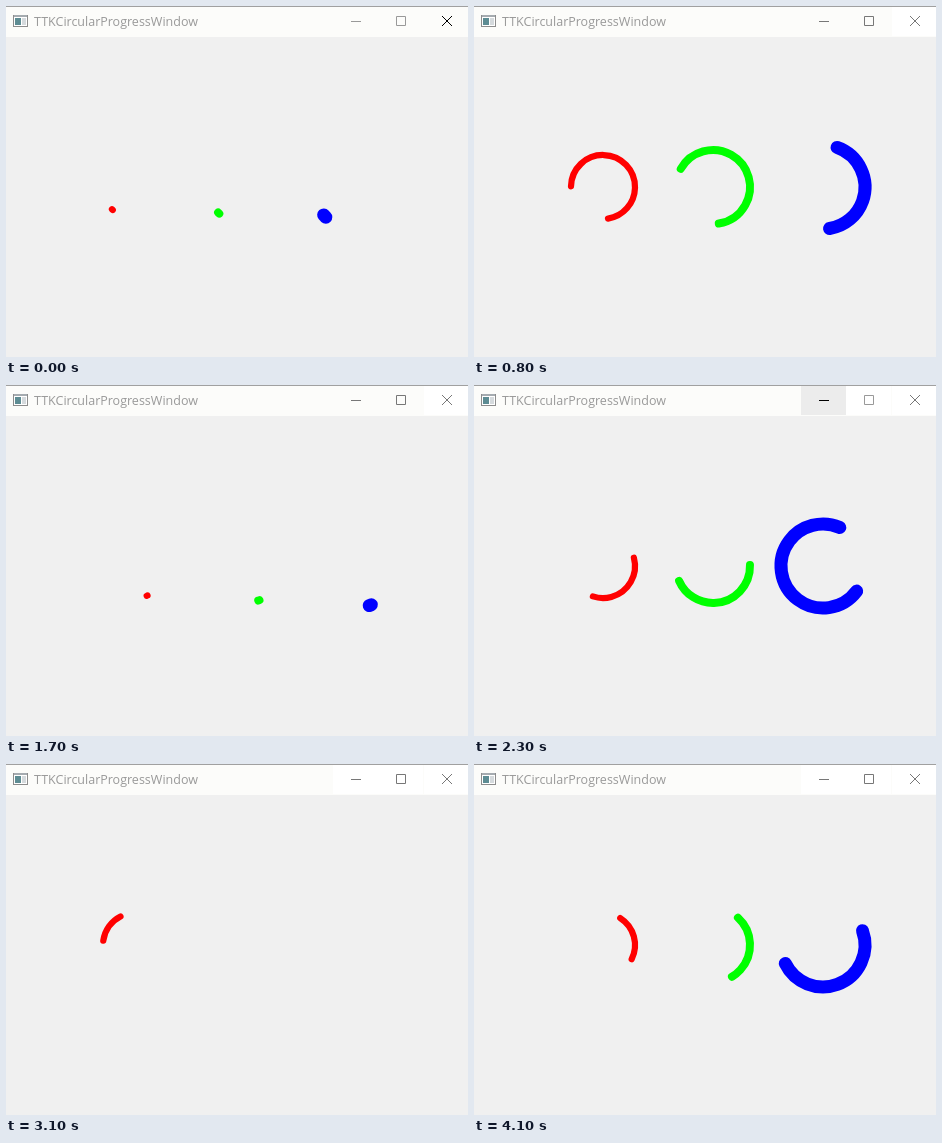
Write an HTML page that moves like this. It is 462 by 351 pixels and loops after 4200 ms.

```html
<!DOCTYPE html>
<html>
<head>
<meta charset="utf-8">
<style>
  html, body { margin: 0; height: 100%; overflow: hidden; background: #f0f0f0; }
  svg { display: block; }
  text { font: 12.5px "Open Sans", "Noto Sans", sans-serif; fill: #999; }
  .ring, .icon { fill: none; }
  .ring { stroke-linecap: round; }
  .icon { stroke: #777; }
</style>
</head>
<body>
<svg width="462" height="351" viewBox="0 0 462 351">
  <rect width="462" height="351" fill="#f0f0f0"/>
  <rect width="462" height="31" fill="#fcfcfa"/>
  <rect width="462" height="1" fill="#a0a0a0"/>

  <rect x="7.5" y="9.5" width="14" height="11" fill="#fff" stroke="#8c8c8c"/>
  <rect x="8" y="9" width="13" height="2" fill="#a5abb0"/>
  <rect x="9" y="12" width="6" height="7" fill="#5d8c93"/>
  <rect x="16" y="12" width="4" height="7" fill="#d5dadd"/>
  <text x="28" y="20">TTKCircularProgressWindow</text>

  <rect id="minBack" x="327" y="1" width="45" height="29"/>
  <rect id="maxBack" x="372" y="1" width="45" height="29"/>
  <rect id="closeBack" x="418" y="1" width="44" height="29"/>
  <path id="minIcon" class="icon" d="M345 15.5h10"/>
  <path id="maxIcon" class="icon" d="M390.5 10.5h9v9h-9z"/>
  <path id="closeIcon" class="icon" d="M436 10l10 10m0-10l-10 10"/>

  <g id="rings"></g>
</svg>
<script>
const LOOP = 4200, STEP = 100;
const PERIOD = 2050, START = 383, SPEED = 1.093;
const byId = id => document.getElementById(id);

const rings = [
  { x: 129, r: 32, pen: 6.25, color: '#f00' },
  { x: 239, r: 37, pen: 8, color: '#0f0' },
  { x: 349, r: 42, pen: 13, color: '#00f' }
];
for (const ring of rings) {
  ring.el = document.createElementNS('http://www.w3.org/2000/svg', 'circle');
  const attrs = { class: 'ring', r: ring.r, pathLength: 360, stroke: ring.color, 'stroke-width': ring.pen };
  for (const name in attrs) ring.el.setAttribute(name, attrs[name]);
  byId('rings').append(ring.el);
}

const inOutQuad = p => p < 0.5 ? 2 * p * p : 1 - 2 * (1 - p) ** 2;
const inOutSine = p => (1 - Math.cos(Math.PI * p)) / 2;

// Linear interpolation through [position, value] keys
function through(keys, p) {
  const i = Math.max(1, keys.findIndex(key => key[0] >= p));
  const [[p0, v0], [p1, v1]] = [keys[i - 1], keys[i]];
  return v0 + (v1 - v0) * (p - p0) / (p1 - p0);
}
const lengthKeys = [[0, 0.1], [0.15, 0.2], [0.6, 20], [1, 20]];
const offsetKeys = [[0, 0], [0.15, 0], [0.6, 7], [0.7, 7], [1, 25]];

function drawRings(t) {
  const phase = (START + t * SPEED) / PERIOD % 1;
  const angle = Math.floor(719 * phase);
  const length = through(lengthKeys, inOutQuad(phase));
  const offset = through(offsetKeys, inOutSine(phase));
  for (const { el, x, pen } of rings) {
    const unit = pen / 25 * 180 / Math.PI;
    const from = offset * unit;
    const sweep = Math.min(length * unit, 360 - from);
    el.style.display = sweep > 0 ? '' : 'none';
    el.setAttribute('stroke-dasharray', `${Math.max(sweep, 0)} 1000`);
    el.setAttribute('transform', `translate(${x} 181) rotate(${angle + from})`);
  }
}

function drawButtons(t) {
  const hover = t >= 2200 && t < 2400;
  const idle = t < 200 ? '#999' : '#777';
  byId('closeBack').style.fill = t < 200 ? 'none' : '#fff';
  byId('maxBack').style.fill = t < 2100 ? 'none' : '#fff';
  byId('minBack').style.fill = hover ? '#ececec' : t < 2400 ? 'none' : '#fff';
  byId('closeIcon').style.stroke = t < 200 ? '#000' : '#777';
  byId('maxIcon').style.stroke = hover ? '#999' : idle;
  byId('minIcon').style.stroke = hover ? '#000' : idle;
}

const begin = performance.now();
function frame() {
  const elapsed = (performance.now() - begin) % LOOP;
  const t = Math.floor(elapsed / STEP) * STEP;
  drawRings(t);
  drawButtons(t);
  requestAnimationFrame(frame);
}
frame();
</script>
</body>
</html>
```
